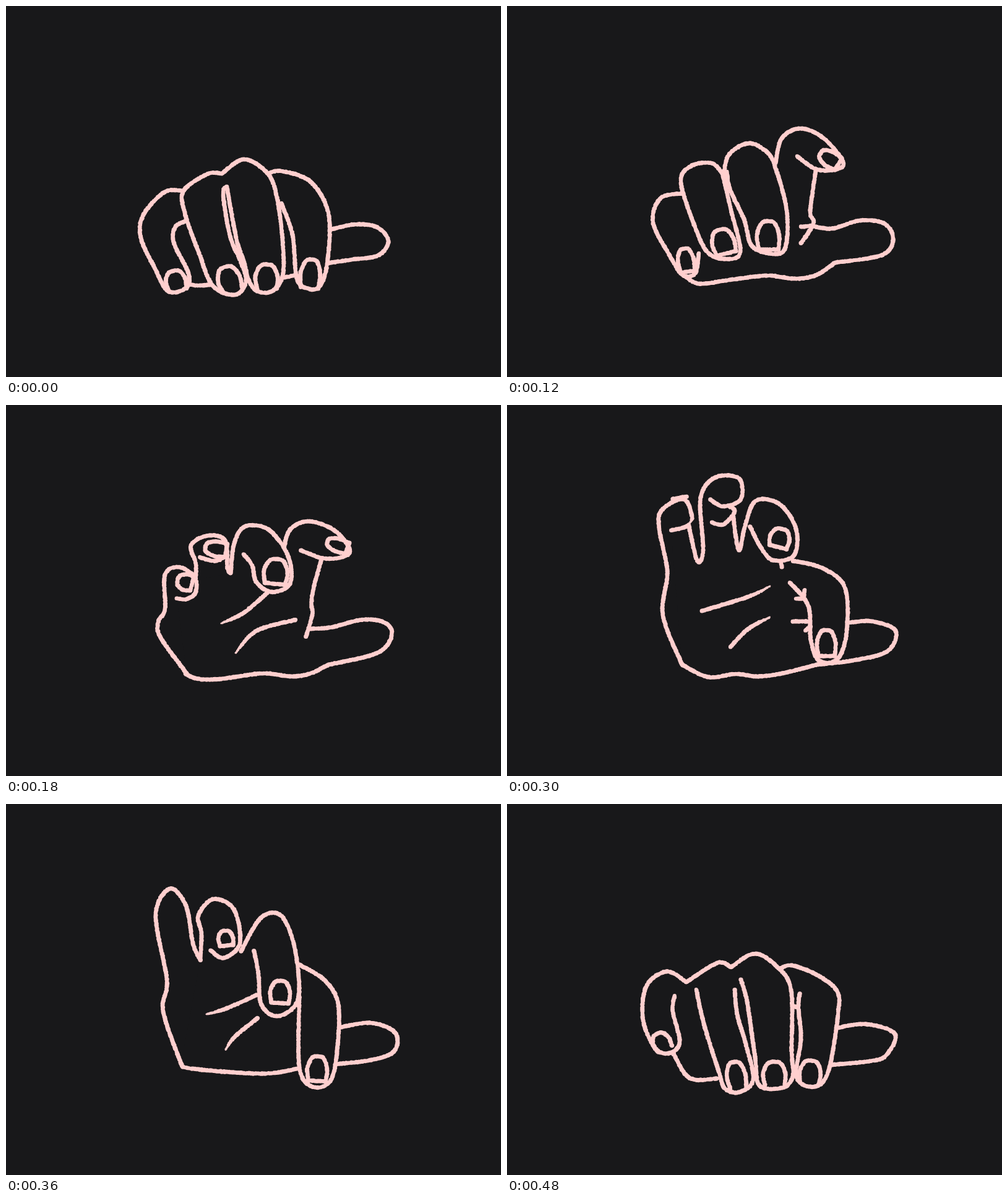
These frames come from a looping animation (800 by 600 pixels, 0.54 s). An HTML page with a canvas:

```html
<!DOCTYPE html>
<html lang="en">
<head>
<meta charset="utf-8">
<title>Drumming hand</title>
<style>
html, body { margin: 0; width: 100%; height: 100%; overflow: hidden; background: #18181a; }
canvas { display: block; }
</style>
</head>
<body>
<canvas id="stage" width="800" height="600"></canvas>
<script>
const ctx = document.getElementById('stage').getContext('2d');
const INK = '#ffcfce', PAPER = '#18181a';
const STEP = 60, RADIUS = 3.3;
const PARTS = ['heel', 'thumb', 'pinky', 'ring', 'index', 'middle'];

let seed = 1;
function rand() {
  seed = (seed * 16807) % 2147483647;
  return seed / 2147483647 - 0.5;
}

// Catmull-Rom value between b and c
function spline(a, b, c, d, t) {
  return b + t / 2 * (c - a + t * (2 * a - 5 * b + 4 * c - d + t * (3 * (b - c) + d - a)));
}

// Dense path through a few points
function smooth(pts) {
  const path = [], last = pts.length - 1;
  const at = i => pts[Math.max(0, Math.min(last, i))];
  for (let i = 0; i < last; i++) {
    const [a, b, c, d] = [at(i - 1), at(i), at(i + 1), at(i + 2)];
    const n = Math.ceil(Math.hypot(c[0] - b[0], c[1] - b[1]) / 1.2);
    for (let k = 0; k < n; k++) {
      path.push([0, 1].map(j => spline(a[j], b[j], c[j], d[j], k / n)));
    }
  }
  path.push(pts[last]);
  return path;
}

const line = text => smooth(text.split(' ').map(p => p.split(',').map(Number)));
const mean = (a, b) => a.map((v, i) => (v + b[i]) / 2);

function between(a, b) {
  const n = Math.max(a.length, b.length) - 1;
  const pick = (p, i) => p[Math.round(i / n * (p.length - 1))];
  return Array.from({ length: n + 1 }, (_, i) => mean(pick(a, i), pick(b, i)));
}

// nails: x, y, width, height, tilt
function hand(parts, nails, marks = [], palm = [], open = false) {
  const pose = { nails, marks: marks.map(line), palm: palm.map(line), open };
  for (const name of PARTS) pose[name] = line(parts[name]);
  return pose;
}

const fist = hand({
  heel: '524,415 460,437 390,444 312,452 285,445',
  thumb: '526,361 565,353 600,358 618,380 602,403 560,410 524,415',
  pinky: '287,299 256,301 222,338 218,375 241,425 262,461 291,456 295,433 271,382 274,357 290,348',
  ring: '349,271 325,272 287,299 289,335 312,400 334,452 370,467 388,445 378,410 362,372 351,305 357,292',
  middle: '349,271 385,248 423,271 438,310 447,380 447,437 428,462 404,460 391,440 385,415 372,375 357,292',
  index: '423,271 445,267 492,284 521,335 520,410 508,452 488,457 470,440 463,370 445,319'
}, [[274, 444, 32, 32, -.2], [360, 441, 36, 40, -.3], [421, 438, 36, 40, 0], [492, 433, 32, 46, .1]],
[], [], true);

const point = hand({
  heel: '530,415 500,435 465,441 420,436 360,443 310,449 287,436',
  thumb: '490,355 525,360 570,347 610,352 624,378 605,403 530,415',
  pinky: '283,303 248,311 236,350 262,402 284,435 304,432 310,400',
  ring: '348,270 330,254 297,259 281,285 303,355 323,397 350,409 377,398 362,330 348,270',
  middle: '350,273 359,240 390,222 420,236 434,262 452,330 450,390 430,401 396,388 383,345 361,298 355,268',
  index: '434,254 444,214 475,198 512,214 543,252 533,264 500,264 469,243'
}, [[289, 411, 26, 38, -.15], [349, 381, 36, 40, -.25], [422, 371, 36, 46, 0], [521, 247, 25, 34, -1]],
['499,265 494,300 490,335 495,352 475,384', '475,357 490,356']);

const claw = hand({
  heel: '512,425 465,437 410,432 345,441 292,433',
  thumb: '489,369 530,358 590,347 622,357 623,375 590,401 512,425',
  pinky: '292,433 250,365 246,335 257,310 257,245 280,231 305,250 306,280 290,292 276,290',
  ring: '306,256 307,225 299,190 325,171 354,180 358,232 363,242',
  middle: '363,242 369,185 387,153 425,160 456,210 459,262 430,278 405,260 398,228 384,206',
  index: '461,240 470,195 500,178 548,189 568,218 540,231 500,229 484,227'
}, [[289, 259, 26, 24, -1.3], [339, 196, 24, 34, -1.4], [436, 239, 38, 40, .1], [550, 206, 17, 34, -1.45]],
['521,233 502,280 495,325 495,365', '486,324 496,324', '487,340 497,338', '313,212 338,219 356,209'],
['422,280 385,317 348,338', '468,331 405,352 371,394']);

const pinch = hand({
  heel: '500,420 445,434 405,439 370,435 325,440 283,420',
  thumb: '552,352 590,350 628,365 615,398 560,413 500,420',
  pinky: '283,420 252,340 259,270 246,200 250,170 285,152 299,180 293,195 265,203',
  ring: '294,195 305,245 312,253 317,230 313,150 337,117 375,119 378,152 350,164 329,153',
  middle: '366,180 370,215 376,234 385,195 402,155 440,160 467,200 464,243 430,251 410,230 393,197',
  index: '462,252 510,264 546,295 549,365 535,410 505,414 491,380 487,325 457,287'
}, [[441, 215, 32, 30, .25], [516, 385, 30, 42, 0]],
['357,163 368,172 350,193 331,190', '268,152 290,148', '443,255 444,262',
  '467,313 478,312 481,299', '462,350 490,350', '482,365 491,358'],
['315,333 390,310 425,293', '361,391 390,362 425,343']);

const reach = hand({
  heel: '480,426 415,436 300,428 283,420',
  thumb: '536,362 590,354 629,370 627,400 590,414 532,421',
  pinky: '283,420 254,335 260,285 242,180 265,137 291,165 302,225 314,252',
  ring: '314,252 316,210 311,180 335,154 368,170 378,225 352,249 331,237',
  middle: '380,238 412,184 445,181 467,235 472,315 440,343 413,325 408,275 401,238',
  index: '474,260 515,285 537,325 535,400 524,448 495,457 474,425 474,310 472,270'
}, [[355, 217, 24, 24, -.1], [443, 304, 32, 36, .05], [503, 428, 32, 40, .05]],
[], ['405,309 355,331 324,340', '407,346 370,376 355,397']);

const close = hand({
  heel: '340,444 295,443 268,402',
  thumb: '530,363 580,356 627,372 612,407 585,416 523,422',
  pinky: '290,288 258,271 225,295 220,350 240,395 262,403 279,385 268,335 271,310',
  ring: '306,300 318,355 343,435 352,460 375,466 398,445 385,385 372,340 368,300',
  middle: '362,264 400,242 435,262 459,300 460,400 462,440 445,459 408,455 401,410 388,320 378,284',
  index: '440,267 460,261 500,276 533,302 535,340 520,430 498,457 468,442 475,380 471,330 473,307'
}, [[249, 384, 28, 28, -.45], [370, 438, 30, 42, -.15], [432, 436, 36, 38, 0], [490, 434, 34, 38, .1]],
['290,288 340,257 362,264', '462,326 471,330'], [], true);

// Passing poses, derived from their neighbours
const lift = { nails: fist.nails.map((n, i) => mean(n, point.nails[i])), marks: [], palm: [] };
for (const name of PARTS) lift[name] = between(fist[name], point[name]);

const squash = ([x, y, ...rest]) => [x, 440 - (440 - y) * .85, ...rest];
const unfold = {
  nails: [...claw.nails.slice(0, 3).map(squash), mean(point.nails[3], claw.nails[3])],
  marks: [between(point.marks[0], claw.marks[0]), claw.marks[3].map(squash)],
  palm: claw.palm.map(p => p.map(squash))
};
for (const name of ['heel', 'thumb', 'index']) unfold[name] = between(point[name], claw[name]);
for (const name of ['pinky', 'ring', 'middle']) unfold[name] = claw[name].map(squash);

const fold = {
  heel: reach.heel,
  pinky: line('283,420 248,365 230,280 250,210 284,220 292,275 276,325 256,300'),
  ring: line('290,250 318,210 358,215 375,280 388,350 370,381 340,365 322,310 312,275'),
  nails: [[272, 302, 20, 26, -.1], [365, 357, 28, 34, -.2],
    mean(reach.nails[1], close.nails[2]), mean(reach.nails[2], close.nails[3])],
  marks: [], palm: []
};
for (const name of ['thumb', 'middle', 'index']) fold[name] = between(reach[name], close[name]);

// Crayon line with a rough edge; a tapered one thins out at its end
function pen(path, taper) {
  ctx.fillStyle = INK;
  ctx.beginPath();
  path.forEach(([px, py], i) => {
    const left = 1 - i / path.length;
    const r = (taper ? Math.min(RADIUS, 1.3 + left * 6) : RADIUS) + rand() * .8;
    const x = px + rand() * .7, y = py + rand() * .7;
    ctx.moveTo(x + r, y);
    ctx.arc(x, y, r, 0, Math.PI * 2);
  });
  ctx.fill();
}

function cover(path) {
  ctx.fillStyle = PAPER;
  ctx.beginPath();
  path.forEach(p => ctx.lineTo(...p));
  ctx.fill();
}

function nail([x, y, w, h, tilt], open) {
  const c = Math.cos(tilt), s = Math.sin(tilt);
  const place = ([u, v]) => [x + u * w * c - v * h * s, y + u * w * s + v * h * c];
  const arch = [[-.42, .5], [-.5, 0], [-.3, -.42], [0, -.5], [.3, -.42], [.5, 0], [.46, .5]].map(place);
  pen(smooth(arch));
  if (!open) pen(smooth([arch[0], arch[6]]));
}

function show(pose) {
  ctx.fillStyle = PAPER;
  ctx.fillRect(0, 0, 800, 600);
  for (const name of PARTS) {
    if (name !== 'heel' && name !== 'thumb') cover(pose[name]);
    pen(pose[name]);
  }
  pose.nails.forEach(n => nail(n, pose.open));
  pose.marks.forEach(m => pen(m));
  pose.palm.forEach(m => pen(m, true));
}

const poses = [fist, lift, point, unfold, claw, pinch, reach, fold, close];
let shown = -1;

function draw() {
  const i = Math.floor(performance.now() / STEP) % poses.length;
  if (i !== shown) {
    shown = i;
    seed = 101 + i * 977;
    show(poses[i]);
  }
  requestAnimationFrame(draw);
}
draw();
</script>
</body>
</html>
```
